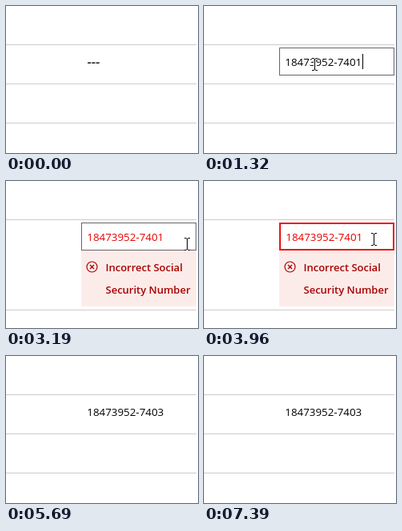
These frames come from a looping animation (240 px wide and 184 px high, 8270 ms). An HTML page with a canvas:

```html
<!DOCTYPE html>
<html lang="en">
<head>
<meta charset="utf-8">
<title>Field validation</title>
<style>
  html, body { margin: 0; width: 100%; height: 100%; overflow: hidden; background: #fff; }
  canvas { display: block; }
</style>
</head>
<body>
<canvas id="stage" width="240" height="184"></canvas>
<script>
const ctx = document.getElementById('stage').getContext('2d');
const LOOP = 8270;
const STEM = '18473952-740', WRONG = STEM + '1', RIGHT = STEM + '3';

const rect = (color, x, y, w, h) => {
  ctx.fillStyle = color;
  ctx.fillRect(x, y, w, h);
};

const text = (str, x, y, color, size = 13.35, weight = 400) => {
  ctx.font = `${weight} ${size}px "Open Sans", "Noto Sans", sans-serif`;
  ctx.fillStyle = color;
  ctx.fillText(str, x, y);
};

const stroke = (path, color, width) => {
  ctx.strokeStyle = color;
  ctx.lineWidth = width;
  ctx.stroke(path);
};

const arrowShape = new Path2D('M.5 .5V16.5L4.3 12.9 6.8 18 9 17 6.6 12H11.5Z');
const beamShape = new Path2D('M-3 -7.5H-1L.5 -6.5 2 -7.5H4M.5 -6.5V6.5M-3 7.5H-1L.5 6.5 2 7.5H4');
const iconShape = new Path2D('M114 107.5A6.5 6.5 0 1 1 101 107.5A6.5 6.5 0 1 1 114 107.5M105 105L110 110M110 105L105 110');

function pointer(x, y, beam) {
  ctx.save();
  ctx.translate(Math.round(x), Math.round(y));
  if (beam) {
    stroke(beamShape, '#fff', 3);
    stroke(beamShape, '#000', 1);
  } else {
    ctx.fillStyle = '#fff';
    ctx.fill(arrowShape);
    stroke(arrowShape, '#000', 1);
  }
  ctx.restore();
}

// Pointer position at time t, or null while it is off stage.
function pointerAt(t) {
  if (t >= 140 && t < 1700) {
    const p = Math.min(1, Math.floor((t - 140) / 81) / 9);
    const e = 1 - (1 - p) ** 2;
    const x = 138 * e, y = 178 - 105 * e;
    return [x, y, x > 94 && y < 87];
  }
  if (t >= 1700 && t < 1780) return [172, 76, true];
  if (t >= 1780 && t < 1860) return [208, 99, false];
  if (t >= 3110 && t < 5120) {
    const [x, y] = t < 3190 ? [234, 81] : t < 3260 ? [226, 79] :
      t < 3410 ? [218, 76] : t < 3490 ? [214, 74] : [212, 73];
    return [x, y, true];
  }
  if (t >= 6850 && t < 7390) {
    const k = Math.floor((t - 6850) / 77);
    return [239 - 38 * k, 101 + 4 * (k - 1.5) ** 2, false];
  }
  return null;
}

// Horizontal place of the text caret, or 0 while hidden.
function caretAt(t) {
  if (t >= 870 && t < 1320) return 102;
  if (t >= 1320 && t < 1860) return 198;
  if (t >= 3410 && t < 3960) return 199;
  if (t >= 4520 && t < 4670) return 192;
  if (t >= 4670 && t < 5240) return 199;
  return 0;
}

function draw(t) {
  const between = (a, b) => t >= a && t < b;
  const error = between(2180, 5690);
  const focus = between(3260, 5240);
  const cursor = pointerAt(t);
  const hover = t < 870 && cursor && cursor[2];
  const editing = hover || between(870, 2180) || between(3110, 5690);

  rect('#fff', 0, 0, 240, 184);
  for (const y of error ? [48, 161] : [48, 97, 146]) rect('#ccc', 0, y, 238, 1);

  if (error) {
    rect('#fcece9', 94, 87, 144, 70);
    stroke(iconShape, '#a80000', 1.2);
    text('Incorrect Social', 124.5, 113, '#a80000', 13, 600);
    text('Security Number', 124.5, 141, '#a80000', 13, 600);
  }
  if (editing) {
    const w = focus ? 2 : 1;
    rect(focus ? '#ea1111' : '#666', 94, 52, 144, 35);
    rect('#fff', 94 + w, 52 + w, 144 - 2 * w, 35 - 2 * w);
  }

  if (t < 870) {
    text('---', 101.5, 75.5, '#222', 16.5, 600);
  } else if (t >= 1320) {
    const value = t < 4290 ? WRONG : t < 4670 ? STEM : RIGHT;
    const color = !error ? '#000' : editing ? '#e80000' : '#d00000';
    text(value, focus ? 102.3 : 101.3, 75, color, 13.35, error ? 400 : 500);
  }

  const caret = caretAt(t);
  if (caret) rect('#000', caret, 60, 1, 19);
  if (cursor) pointer(...cursor);
}

const start = performance.now();
function tick() {
  draw((performance.now() - start) % LOOP);
  requestAnimationFrame(tick);
}
tick();
</script>
</body>
</html>
```
